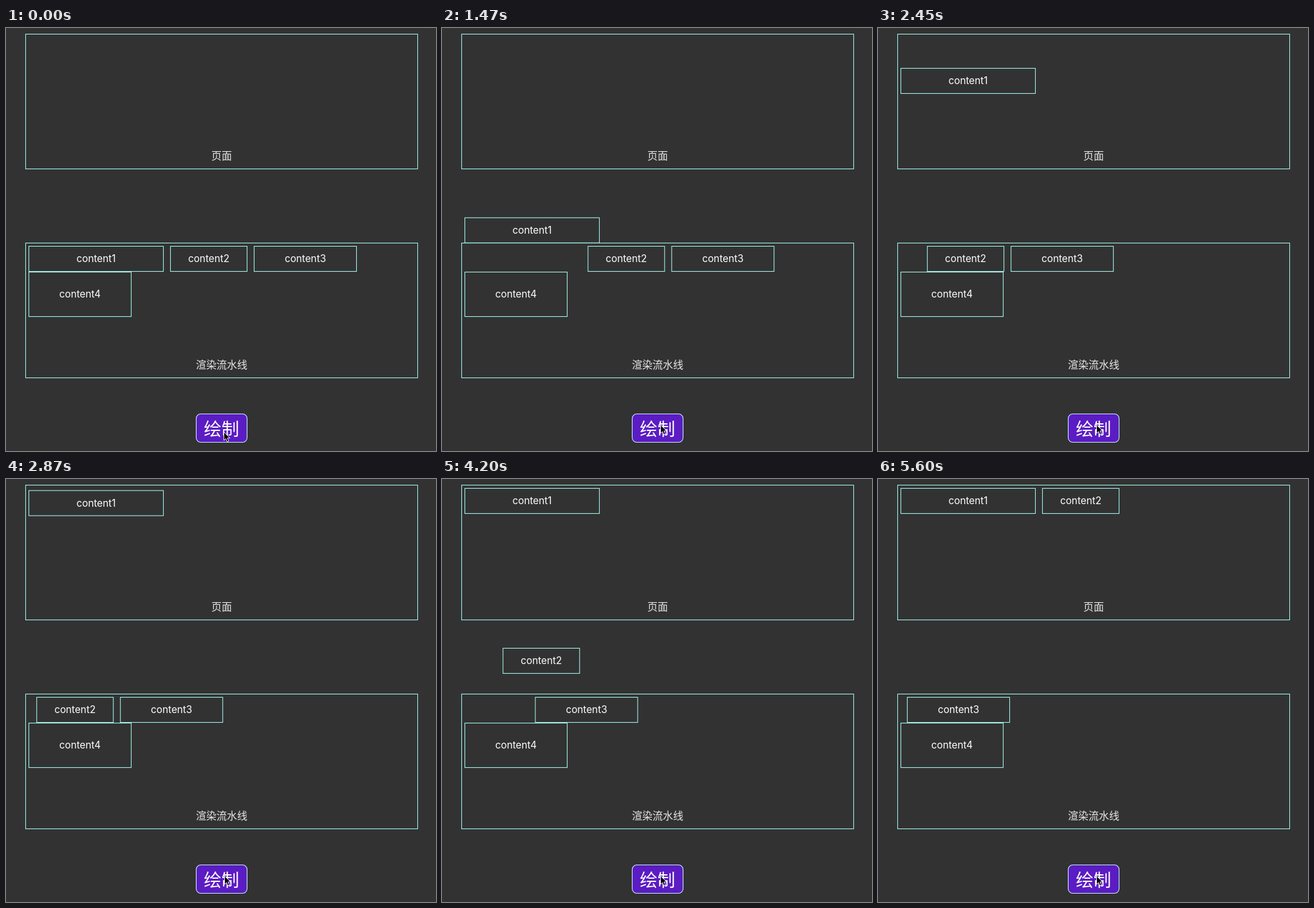
Recreate the animation shown at these times as an HTML page. Size 668x656 px, loop 5880 ms.

```html
<!DOCTYPE html>
<html lang="zh-CN">
<head>
<meta charset="utf-8">
<title>绘制</title>
<style>
  @property --t { syntax: "<number>"; inherits: true; initial-value: 0; }

  html, body { margin: 0; width: 100%; height: 100%; overflow: hidden; background: #323232; }

  /* --t is the loop time in ms; --p and --q ease in and out quadratically */
  svg {
    display: block; width: 100%; height: 100%;
    animation: clock 5880ms steps(84) infinite;
    --p1: clamp(0, (var(--t) - 921) / 2101, 1);
    --a1: min(var(--p1), .5);
    --b1: max(var(--p1) - .5, 0);
    --p: calc(2 * var(--a1) * var(--a1) + 2 * var(--b1) * (1 - var(--b1)));
    --q1: clamp(0, (var(--t) - 3467) / 2140, 1);
    --a2: min(var(--q1), .5);
    --b2: max(var(--q1) - .5, 0);
    --q: calc(2 * var(--a2) * var(--a2) + 2 * var(--b2) * (1 - var(--b2)));
    --m: clamp(0, (var(--t) - 420) / 350, 1);
  }
  @keyframes clock { from { --t: 0; } to { --t: 5880; } }

  rect { fill: none; stroke: #a0eee6; stroke-width: 1.1; }
  text { fill: #fff; text-anchor: middle; font: 15.3px Inter, sans-serif; }
  .zh { fill: #e6e6e6; font: 16px "Noto Sans CJK SC", "Noto Sans CJK", sans-serif; }
  .button rect { fill: #5b1cc3; stroke: #c4eef6; }
  .button text { fill: #fff; font-size: 27.5px; }

  #c1 { transform: translateY(calc(var(--p) * -324px)); }
  #c2 { transform: translate(calc((var(--q) - var(--p)) * 210px), calc(var(--q) * -324px)); }
  #c3 { transform: translateX(calc(var(--p) * -210px - var(--q) * 130px)); }
  #cursor { transform: translate(calc(338px + var(--m) * 1px), calc(626px - var(--m) * 11px)); }
</style>
</head>
<body>
<svg viewBox="0 0 668 656">
  <rect x="30.5" y="9.5" width="609" height="209"/>
  <text class="zh" x="335" y="204">页面</text>

  <rect x="30.5" y="333.5" width="609" height="209"/>
  <text class="zh" x="335" y="528">渲染流水线</text>

  <g id="c4">
    <rect x="35.5" y="378.5" width="159" height="69"/>
    <text x="115" y="418.3">content4</text>
  </g>
  <g id="c3">
    <rect x="385.5" y="338.5" width="159" height="39"/>
    <text x="465" y="363.3">content3</text>
  </g>
  <g id="c2">
    <rect x="255.5" y="338.5" width="119" height="39"/>
    <text x="315" y="363.3">content2</text>
  </g>
  <g id="c1">
    <rect x="35.5" y="338.5" width="209" height="39"/>
    <text x="140" y="363.3">content1</text>
  </g>

  <g class="button">
    <rect x="295.5" y="598.5" width="79" height="44" rx="7"/>
    <text class="zh" x="334.7" y="631.7">绘制</text>
  </g>

  <path id="cursor" d="M.5 .5V13.6L3.5 10.8L5.6 15.7L8 14.7L5.9 9.9H10Z"
        fill="#000" stroke="#fff" stroke-width=".9" stroke-linejoin="round"/>
</svg>
</body>
</html>
```
